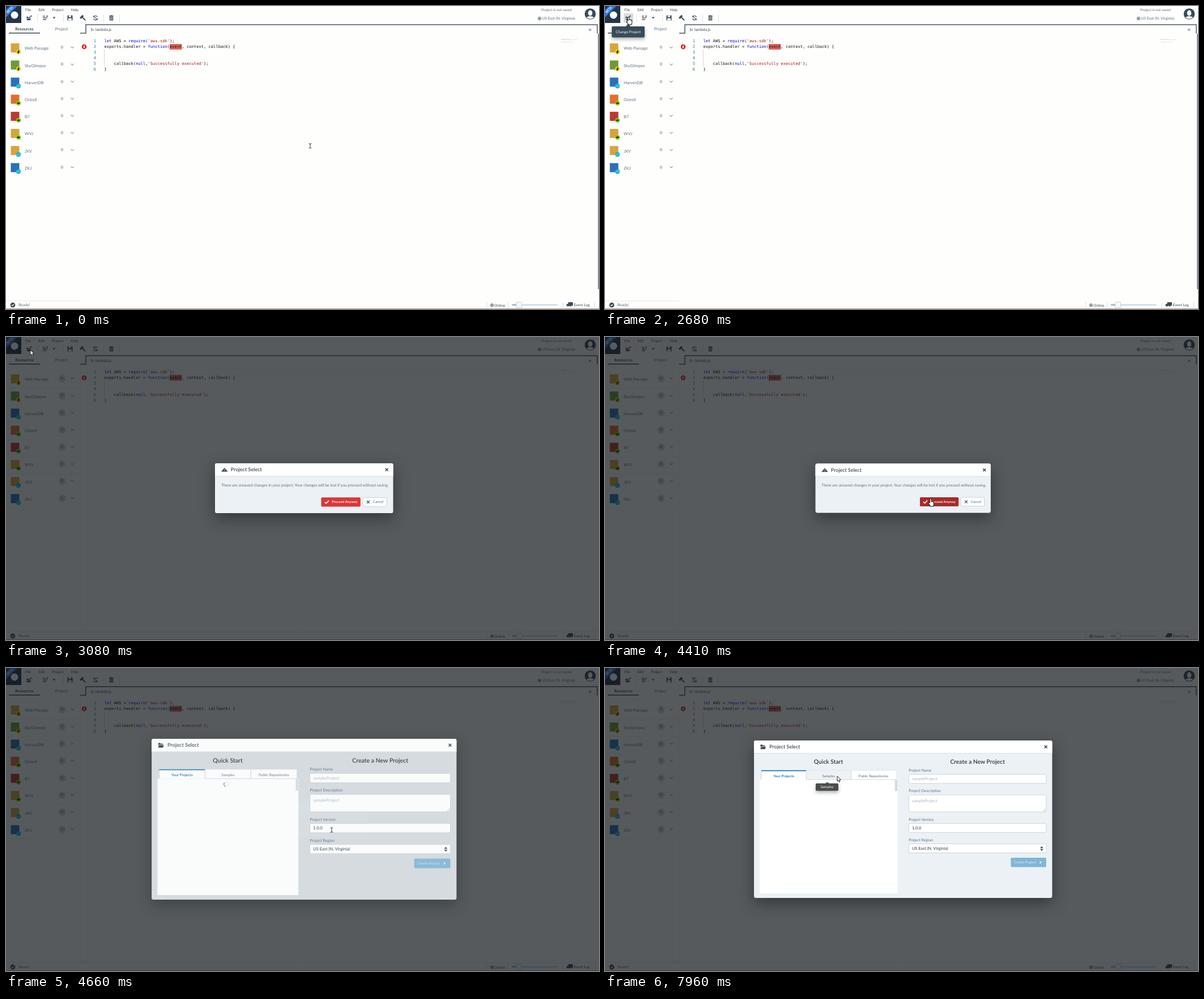
An HTML page with a canvas that plays this animation: 1047x535 px, repeating every 8000 ms.

```html
<!DOCTYPE html>
<html lang="en">
<head>
<meta charset="utf-8">
<title>Project select</title>
<style>
html, body { margin: 0; width: 100%; height: 100%; overflow: hidden; background: #fefefc; }
canvas { display: block; width: 1047px; height: 535px; }
</style>
</head>
<body>
<canvas id="stage" width="1047" height="535"></canvas>
<script>
const ctx = document.getElementById('stage').getContext('2d');
const W = 1047, H = 535, LOOP = 8000, STEP = 133, TAU = Math.PI * 2;
const WARN = 2782, SELECT = 4421, POP = 360; // dialog openings and their length
const UI = 'Lato, "Open Sans", sans-serif', MONO = '"DejaVu Sans Mono", monospace';
const PAGE = '#fefefc', INK = '#394b59', DARK = '#293742', GRAY = '#5c7080', EDGE = '#c3ced6', RULE = '#dfe4e7';

const clamp = u => Math.max(0, Math.min(1, u));
const smooth = u => u * u * (3 - 2 * u);
const progress = (t, from, to) => clamp((t - from) / (to - from));

// Dialogs grow from half size with a slight overshoot while fading in.
const popScale = u => 1 + (2.1 * (u - 1) ** 3 + 1.1 * (u - 1) ** 2) / 2;
const popAlpha = u => u > 0 ? clamp(.1 + 1.2 * u) : 0;

const moves = [
  { from: 1200, to: 2250, x: 52, y: 37 },
  { from: 2250, to: 2400, x: 42, y: 20 },
  { from: 2680, to: 2800, x: 43, y: 23 },
  { from: 3400, to: 3600, x: 490, y: 274 },
  { from: 3750, to: 4270, x: 575, y: 286 },
  { from: 4790, to: 5900, x: 452, y: 224 },
  { from: 5900, to: 6990, x: 410, y: 191 }
];
function pointerAt(t) {
  let x = 537, y = 247;
  for (const m of moves) {
    const u = smooth(progress(t, m.from, m.to));
    x += (m.x - x) * u;
    y += (m.y - y) * u;
  }
  return { x, y };
}

// Returns the width, so that texts can follow each other.
function text(s, x, y, size, color, { weight = 400, align = 'left', font = UI } = {}) {
  ctx.save();
  ctx.translate(x, y + size * .33);
  ctx.scale(.1, .1);
  ctx.font = `${weight} ${size * 10}px ${font}`;
  ctx.textAlign = align;
  ctx.fillStyle = color;
  ctx.fillText(s, 0, 0);
  const width = ctx.measureText(s).width / 10;
  ctx.restore();
  return width;
}
const MID = { align: 'center' }, BOLD = { weight: 600 }, TITLE = { weight: 600, align: 'center' };

function box(x, y, w, h, fill, r = 0, edge) {
  ctx.beginPath();
  ctx.roundRect(x, y, w, h, r);
  if (fill) { ctx.fillStyle = fill; ctx.fill(); }
  if (edge) { ctx.strokeStyle = edge; ctx.lineWidth = .8; ctx.stroke(); }
}
function trace(pts) {
  ctx.beginPath();
  for (let i = 0; i < pts.length; i += 2) ctx.lineTo(pts[i], pts[i + 1]);
}
function line(pts, color, w = 1) {
  trace(pts);
  ctx.strokeStyle = color;
  ctx.lineWidth = w;
  ctx.stroke();
}
function oval(x, y, rx, ry, color) {
  ctx.beginPath();
  ctx.ellipse(x, y, rx, ry, 0, 0, TAU);
  ctx.fillStyle = color;
  ctx.fill();
}
const disc = (x, y, r, color) => oval(x, y, r, r, color);
function ring(x, y, r, color, w = 1, from = 0, to = TAU) {
  ctx.beginPath();
  ctx.arc(x, y, r, from, to);
  ctx.strokeStyle = color;
  ctx.lineWidth = w;
  ctx.stroke();
}
function at(x, y, draw, turn = 0) {
  ctx.save();
  ctx.translate(x, y);
  ctx.rotate(turn);
  draw();
  ctx.restore();
}
// Triangle pointing right, turned by quarter turns.
function tri(x, y, r, quarters, color) {
  at(x, y, () => {
    trace([r * .6, 0, -r * .6, r, -r * .6, -r]);
    ctx.fillStyle = color;
    ctx.fill();
  }, quarters * TAU / 4);
}
function shadow(blur, dy, alpha) {
  ctx.shadowColor = `rgba(16,22,26,${alpha})`;
  ctx.shadowBlur = blur;
  ctx.shadowOffsetY = dy;
}
function cross(x, y, r, w) {
  for (const s of [-1, 1]) line([x - r, y - r * s, x + r, y + r * s], INK, w);
}
const tick = (x, y, s, w) => line([x - s, y, x - s * .3, y + s * .65, x + s, y - s * .7], '#fff', w);
const bolt = (x, y, s, color) => line([x + s * .4, y - s, x - s * .4, y, x + s * .4, y, x - s * .4, y + s], color, s * .45);
function globe(x, y) {
  ring(x, y, 2.7, INK, .8);
  tick(x, y, 1.6, 1);
  disc(x, y, 1.2, INK);
}
function folder(x, y, s) {
  box(x - s, y - s * .8, s * .7, s * .4, INK, .5);
  box(x - s, y - s * .55, s * 1.6, s * 1.4, INK, .5);
  at(x, y, () => {
    ctx.transform(1, 0, -.4, 1, 0, 0);
    box(-s * .8, -s * .1, s * 1.8, s, INK, .5, '#fff');
  });
}

const toolIcons = {
  41: () => {
    folder(-.5, 1, 4);
    line([1, -1.5, 4, -4], INK, 1.1);
    tri(4, -3.6, 1.6, -.5, INK);
  },
  69: () => {
    for (const y of [-3, 0, 3]) line([-4, y, 1 + y % 2 + (y ? 0 : 3), y], INK, 1.3);
    line([2, -3, 5, -3], INK);
    line([3.5, -4.5, 3.5, -1.5], INK);
  },
  85: () => tri(0, 0, 2.5, 1, INK),
  113: () => {
    box(-4.5, -4.5, 9, 9, INK, 1);
    box(-2.3, -4.5, 4.2, 3.2, PAGE);
    box(-3, .6, 6, 3.9, PAGE);
  },
  136: () => at(0, 0, () => {
    box(-1, -2, 2, 8, INK, .8);
    box(-4, -4.5, 7, 3.3, INK, .6);
  }, -TAU / 8),
  158: () => {
    ring(0, 0, 3.7, INK, 1.2, .3, 2.8);
    ring(0, 0, 3.7, INK, 1.2, 3.5, 5.9);
    line([-4, -3.6, 4, 3.6], INK, 1.1);
  },
  186: () => {
    box(-4, -3.8, 8, 1.4, INK);
    box(-1.6, -4.8, 3.2, 1.2, INK);
    box(-3.2, -1.8, 6.4, 6.4, INK, .7);
    for (const x of [-1.5, 0, 1.5]) line([x, -.7, x, 3.4], PAGE, .7);
  }
};

function drawHeader(t) {
  box(0, 0, 27, 30, '#25364a');
  disc(15, 16, 6.5, '#fff');
  at(6.8, 6.8, () => {
    box(-15, -4.6, 30, 9.2, '#2f7bdc');
    text('BETA', 0, 0, 5.6, '#fff', { weight: 700, align: 'center' });
  }, -TAU / 8);
  if (t >= 2400 && t < 3000) box(33, 13, 17, 16, '#d9dcdd', 1);
  let x = 34;
  for (const s of ['File', 'Edit', 'Project', 'Help']) x += text(s, x, 6.5, 6.5, INK) + 13;
  for (const sep of [55.5, 101.5, 172.5, 200.5]) line([sep, 15, sep, 28], '#d3d9dd', .8);
  for (const pos in toolIcons) at(+pos, 21, toolIcons[pos]);
  text('Project is not saved', 945, 6.5, 6.3, GRAY);
  globe(942, 22);
  text('US East (N. Virginia)', 946.5, 22, 6.7, GRAY);
  at(1031.5, 14, () => {
    disc(0, 0, 9.8, INK);
    ctx.beginPath();
    ctx.arc(0, 0, 8.8, 0, TAU);
    ctx.clip();
    oval(0, 8.5, 7.6, 4.6, PAGE);
    oval(0, -1.5, 3.8, 5, PAGE);
  });
}

const YELLOW = '#f5d800', CYAN = '#12b4dc', GREEN = '#7fd000', GOLD = '#d9a43c', NAVY = '#2d70b5';
const services = [['Web Passage', GOLD, YELLOW], ['SkyGlimpse', '#6f9a35', YELLOW], ['HarvenDB', NAVY, CYAN],
  ['Ostrell', '#e0702a', GREEN], ['B7', '#bb3a2e', GREEN], ['WVJ', GOLD, GREEN], ['JXV', GOLD, CYAN], ['ZKJ', NAVY, CYAN]];
const marks = {
  [YELLOW]: y => bolt(22, y, 3, '#222'),
  [CYAN]: y => text('</>', 22, y, 4.4, '#fff', TITLE),
  [GREEN]: y => oval(22, y, 2.7, 1.4, '#222')
};

function drawSidebar(t) {
  const lined = t >= WARN;
  text('Resources', 32.5, 41, 7.2, DARK, TITLE);
  text('Project', 98, 41, 7.3, GRAY, MID);
  line([5, 47.8, 60, 47.8], INK, 1.4);
  services.forEach(([name, color, mark], i) => {
    const y = 73 + 30.2 * i;
    box(8.5, y - 7, 15, 16, color);
    disc(22, y + 8, 4.1, mark);
    marks[mark](y + 8);
    text(name, 33, y + 2, 7.3, GRAY);
    if (lined) {
      disc(99, y + .5, 6.5, 'rgba(138,155,168,.36)');
      line([0, y + 17.5, 131, y + 17.5], '#e9ecee', .8);
    }
    text('0', 99, y, 6.6, INK, MID);
    line([114.3, y - 1.2, 117, y + 1.3, 119.7, y - 1.2], GRAY);
  });
  if (lined) line([131.5, 49, 131.5, 520], '#edf0f1', .8);
}

const BLUE = '#0000e8', RED = '#a31515', ADV = 4.28, EM = ADV / .602;
const code = `let AWS = require('aws-sdk');
exports.handler = function(event, context, callback) {


    callback(null,'Successfully executed');
}`.split('\n');
const lineY = i => 62 + 9.85 * i;
const tint = s => s[0] === "'" ? RED : /^(let|require|function|null)$/.test(s) ? BLUE : '#111';
function drawCode() {
  code.forEach((row, i) => {
    for (const m of row.matchAll(/'[^']*'|\w+|[^\w']+/g))
      text(m[0], 173.5 + m.index * ADV, lineY(i), EM, tint(m[0]), { font: MONO });
  });
}

function drawEditor(t) {
  line([131, 48, 141, 48, 141, 33, 1044, 33, 1044, 48.5], '#4a5863', 1.5);
  if (t < WARN) box(1045, 49, 2, 451, '#8a9094');
  text('fx', 149.5, 42, 7, INK, { weight: 'italic 400' });
  text('lambda.js', 158, 42, 6.9, INK);
  cross(1031.3, 42, 2, .9);
  if (t >= 3000) box(176, 57.2, 802, 9, null, 0, 'rgba(120,130,140,.16)');
  box(289, 67, 21.5, 10, '#e2655c');
  line([173.6, 77, 173.6, 106], '#c9cccc', .8);
  code.forEach((_, i) => text(i + 1, 159, lineY(i), EM, '#237893', { align: 'right', font: MONO }));
  drawCode();
  disc(138, 72, 4.2, '#e01414');
  bolt(138, 72, 2.6, '#fff');
  at(957.8, 50.4, () => { // minimap
    ctx.globalAlpha = .75;
    ctx.scale(.128, .128);
    drawCode();
  });
}

function drawFooter(t) {
  line([0, 520.7, t >= WARN ? W : 131, 520.7], RULE, .8);
  disc(12, 528, 4.4, INK);
  tick(12, 528, 2.2, 1.1);
  text('Ready!', 22, 528, 6.9, GRAY);
  for (const x of [849, 886.5, 983.5, 1039.5]) line([x, 523, x, 533], '#ccd3d8', .8);
  globe(858, 528.3);
  text('Online', 862, 528.3, 6.7, INK);
  box(893, 526.3, 81, 3, '#cfe0ec', 1.5);
  box(893, 526.3, 12, 3, '#9fc3de', 1.5);
  box(901, 523, 9.5, 9.5, '#f8fafb', 1.5, '#b4c0c9');
  box(992.5, 523, 8.5, 6, INK, .8);
  tri(997, 530, 2, 1, INK);
  box(989.8, 526, 5, 4.2, INK, .6);
  text('Event Log', 1002.5, 528, 6.5, INK);
  box(0, 534, W, 1, '#b98f80');
}

function tooltip(s, cx, y, w, h, tip, size, color, alpha) {
  ctx.save();
  ctx.globalAlpha = alpha;
  ctx.save();
  shadow(6, 3, .35);
  box(cx - w / 2, y, w, h, color, 1.7);
  ctx.restore();
  tri(cx, y - tip * .3, tip, -1, color);
  text(s, cx, y + h / 2, size, '#f5f8fa', MID);
  ctx.restore();
}

function dialog(scale, alpha, w, h, body) {
  if (alpha <= 0) return;
  const cx = 526.3, cy = 267, x = cx - w / 2, y = cy - h / 2;
  ctx.save();
  ctx.globalAlpha = alpha;
  ctx.translate(cx, cy);
  ctx.scale(scale, scale);
  ctx.translate(-cx, -cy);
  ctx.save();
  shadow(26, 9, .5 * alpha ** 2);
  box(x, y, w, h, '#ebf1f5', 3.4);
  ctx.restore();
  box(x, y, w, 22.5, '#fff', [3.4, 3.4, 0, 0]);
  line([x, y + 22.5, x + w, y + 22.5], '#d3dbe1', .8);
  text('Project Select', x + 27.3, y + 11.2, 8.9, INK, BOLD);
  cross(x + w - 11.2, y + 11.2, 2.4, 1.5);
  body(x + 16.5, y + 11.2);
  ctx.restore();
}

function drawWarning(t, opened, replaced) {
  const gone = popAlpha(replaced);
  dialog(popScale(opened) - gone * .3, popAlpha(opened) * (1 - gone), 309.5, 86.8, (ix, iy) => {
    tri(ix, iy, 5.7, -1, INK);
    text('!', ix, iy + .8, 6, '#fff', { weight: 700, align: 'center' });
    text('There are unsaved changes in your project. Your changes will be lost if you proceed without saving.', 382.5, 262, 6.75, GRAY);
    box(556, 283, 68.3, 16, t >= 4200 ? '#a82a2a' : '#db3737', 1.7);
    tick(565.7, 291, 3.6, 1.6);
    text('Proceed Anyway', 574.5, 291, 6, '#fff', BOLD);
    box(628.2, 283.2, 41.6, 15.6, '#fcfdfd', 1.7, EDGE);
    cross(637.6, 291, 2.4, 1.2);
    text('Cancel', 646, 291, 6.2, GRAY);
  });
}

function drawTabs(hover) {
  const w = 79.2;
  box(273, 197, 243.5, 201, '#fff');
  ['Your Projects', 'Samples', 'Public Repositories'].forEach((name, i) => {
    const x = 276 + w * i, on = i === 0;
    box(x, 181, w, 16, hover && i === 1 ? '#f0f2f4' : '#fff');
    line([x, 181, x + w, 181], '#d8e0e6', .7);
    line([x, 181, x, 197], EDGE, .8);
    if (on) box(x, 180.6, w, 1.7, '#1f7fb8');
    else line([x, 197, x + w, 197], EDGE, .8);
    text(name, x + w / 2, 190.5, 6.3, on ? '#106ba3' : GRAY, on ? TITLE : MID);
  });
  box(511.8, 197.4, 4.2, 20, '#d6d9dc');
}

const fields = [['Name', 'sampleProject'], ['Description', 'sampleProject'], ['Version', '1.0.0'], ['Region', 'US East (N. Virginia)']];
function drawForm() {
  let y = 181;
  for (const [name, value] of fields) {
    const tall = name === 'Description', hint = value === 'sampleProject';
    const h = tall ? 30 : 15.9, top = y + 6.9;
    text('Project ' + name, 536.3, y, 6.7, GRAY);
    box(536.5, top, 242.5, h, '#fff', 1.7, EDGE);
    text(value, 542, top + (tall ? 10.5 : 8), 7.3, hint ? '#a7b6c2' : DARK);
    if (tall) for (const d of [2, 4.5]) line([778 - d, top + h - 1, 778, top + h - 1 - d], '#8a949c', .7);
    y = top + h + 13.4;
  }
  for (const s of [-1, 1]) tri(771, 318.8 + 2.4 * s, 2.8, s, INK);
  box(716.5, 335, 62.5, 16.5, '#82b5d7', 1.7);
  text('Create Project', 722.3, 343.2, 6.15, '#dcebf5');
  tri(769.3, 343.2, 2.7, 0, '#e6f1f8');
}

function drawSelect(t, opened, pointer) {
  dialog(popScale(opened), popAlpha(opened), 526.5, 278, (ix, iy) => {
    folder(ix, iy, 5);
    text('Quick Start', 394.5, 166, 10.3, DARK, TITLE);
    text('Create a New Project', 657.7, 166, 10.3, DARK, TITLE);
    drawTabs(t > 6000 && pointer.y < 197);
    const a = t / 500 * TAU;
    ring(392, 206.5, 4.2, '#dfe4e8', 1.1);
    ring(392, 206.5, 4.2, GRAY, 1.1, a, a + TAU * .3);
    drawForm();
  });
}

const cursors = {
  beam() {
    line([0, -3.6, 0, 3.6], '#333');
    for (const s of [-1, 1]) line([-2.5, 4.2 * s, 0, 3.5 * s, 2.5, 4.2 * s], '#333', .9);
  },
  hand() {
    for (const [grow, color] of [[.5, '#111'], [-.4, '#fff']]) {
      const part = (x, y, w, h, r) => box(x - grow, y - grow, w + 2 * grow, h + 2 * grow, color, r);
      part(-1.2, -.6, 2.4, 9, 1);
      part(-1.8, 4.6, 7.2, 8.4, 2);
      part(-3.8, 6.8, 4, 3, 1.2);
    }
  },
  arrow() {
    trace([0, 0, 0, 9, 2, 7.2, 3.5, 10.4, 5, 9.7, 3.6, 6.6, 6.4, 6.4]);
    ctx.closePath();
    ctx.fillStyle = '#fff';
    ctx.strokeStyle = '#111';
    ctx.lineWidth = .9;
    ctx.fill();
    ctx.stroke();
  }
};
function cursorKind(t, { x, y }) {
  if (t < WARN) return x > 141 ? 'beam' : y < 30 ? 'hand' : 'arrow';
  if (t < SELECT) return x > 556 && y > 283 ? 'hand' : 'arrow';
  return x > 536 && y > 274 ? 'beam' : 'arrow';
}

function render(t) {
  const pointer = pointerAt(t);
  const warned = progress(t, WARN, WARN + POP), selected = progress(t, SELECT, SELECT + POP);
  box(0, 0, W, H, PAGE);
  drawHeader(t);
  drawSidebar(t);
  drawEditor(t);
  drawFooter(t);
  if (t >= 2500 && t < 3000) tooltip('Change Project', 41, 36, 58, 19.5, 5.5, 6.6, INK, 1 - warned);
  box(0, 0, W, H, `rgba(16,22,26,${.7 * popAlpha(warned) ** .8})`);
  drawWarning(t, warned, selected);
  drawSelect(t, selected, pointer);
  if (t > 7100) tooltip('Samples', 392, 203.7, 40, 13, 2.4, 6.4, '#4a4b4d', progress(t, 7050, 7290));
  at(pointer.x, pointer.y, cursors[cursorKind(t, pointer)]);
}

ctx.textRendering = 'geometricPrecision';
const start = performance.now();
function play() {
  const t = (performance.now() - start) % LOOP;
  render(Math.floor(t / STEP) * STEP);
  requestAnimationFrame(play);
}
play();
</script>
</body>
</html>
```
